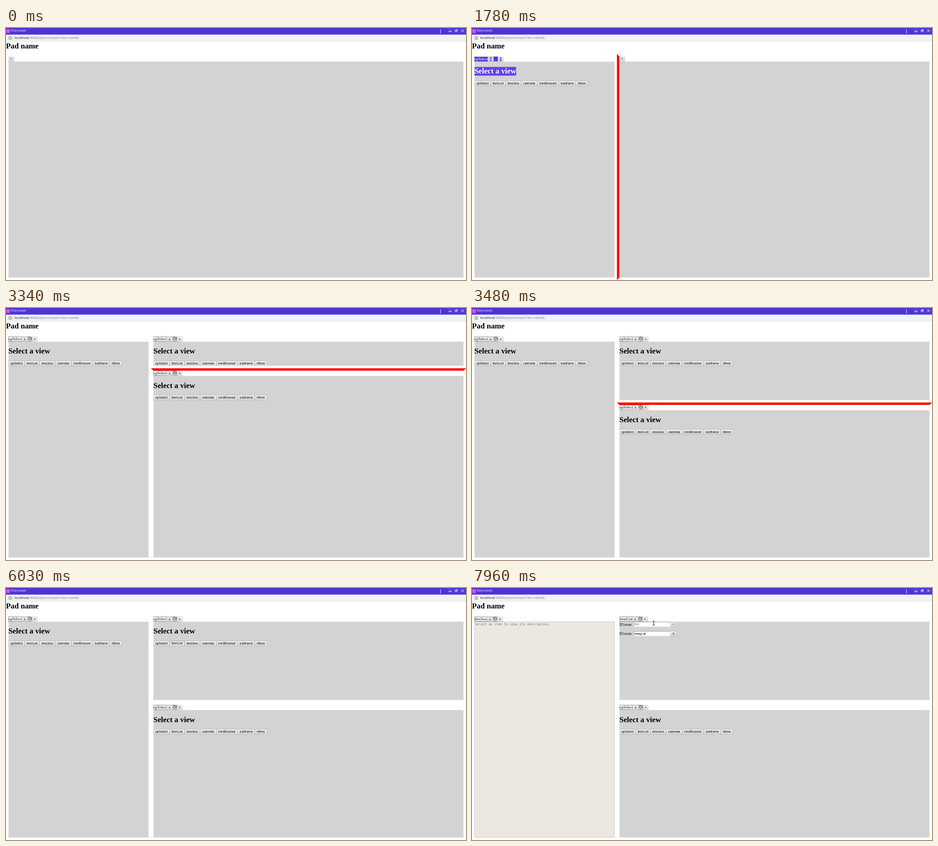
Animation of 1010x554 px, one loop 8 s. Source, as an HTML page:

```html
<!DOCTYPE html>
<html lang="en">
<head>
<meta charset="utf-8">
<title>Polymorph</title>
<style>
  html, body { margin: 0; width: 100%; height: 100%; overflow: hidden; background: #fff; }
  /* The desktop is laid out at 1920 px wide and shrunk to the 1010 px stage. */
  #desktop { position: absolute; width: 1920px; height: 1053px; overflow: hidden;
    transform: scale(.526042); transform-origin: 0 0; font: 16px "Liberation Serif", serif; color: #000; }
  #desktop * { box-sizing: border-box; }
  h1 { font-size: 32px; line-height: 37px; margin: 21.4px 0; position: relative; }

  #titlebar, #address { position: absolute; left: 0; width: 100%; height: 28px; white-space: nowrap; }
  #titlebar { top: 0; background: #4b35d5; color: #eeeaff; font: 12px/25px "DejaVu Sans", sans-serif; padding-left: 21px; }
  #address { top: 28px; background: #f1f3f4; color: #80868b; border-bottom: 1px solid #cfd1d3;
    font: 14px/27px "DejaVu Sans", sans-serif; padding-left: 34px; }
  #address b { font-weight: 400; color: #2c2e32; }
  #favicon { position: absolute; left: 1px; top: 5px; width: 16px; height: 16px; background: #ee45dc; }
  .icons { position: absolute; left: 0; top: 0; }
  #padname { position: absolute; left: 0; top: 56px; margin: 0; }

  .pane { position: absolute; border: 10px solid transparent; overflow: hidden; }
  .head { display: flex; align-items: center; height: 22px; width: max-content; }
  .tab { display: flex; align-items: center; height: 20px; border: 1px solid #000; line-height: 18px; }
  .gear { width: 17px; height: 19px; margin-top: -3px; }
  .pane[data-view=none] .head { height: 21px; }
  .pane[data-view=none] .tab { display: none; }
  .body { position: absolute; top: 22px; left: 0; right: 0; bottom: 0; background: lightgray; }
  .pane[data-view=none] .body { top: 21px; }
  .view { display: none; }
  .pane[data-view=opSelect] .opSelect, .pane[data-view=itemList] .itemList,
  .pane[data-view=descbox] .descbox { display: block; }

  button { font: 13.333px/15px "Liberation Sans", Arial, sans-serif; height: 21px; margin: 0; padding: 0 7px;
    border: 1px solid #a3a3a3; border-radius: 2px; background: linear-gradient(#f2f2f2, #d9d9d9);
    color: #000; vertical-align: top; flex: none; }
  button.hover { background: linear-gradient(#fff, #e8e8e8); }
  button.press { background: linear-gradient(#dfdfdf, #f0f0f0); border-color: #858585; }
  .close, .add { font-weight: 700; }
  .close { color: #e00012; }
  .add { color: #3a1fe0; }

  .mark { position: absolute; left: 0; top: 0; background: #6042ee; color: #fff; }
  .selected .tab > span, .selected .head button span { background: #5236e2; color: #fff; }
  .selected .gear { background: #5236e2; }
  .selected .gear * { opacity: 0; }

  .row { height: 39px; display: flex; line-height: 21px; white-space: nowrap; }
  .field { width: 154px; height: 21px; margin-left: 7px; padding: 0 1px; background: #fff; border: 2px solid;
    border-color: #9a9a9a #eee #eee #9a9a9a; font: 13.333px/17px "Liberation Sans", Arial, sans-serif; }
  .hint { color: #8a8a8a; }
  .descbox { position: absolute; inset: 0; background: #ece7e1; border: 1px solid #a9a9a9; padding: 2px;
    font: 13.333px/16px "DejaVu Sans Mono", monospace; color: #757575; white-space: nowrap; }
  #ibeam { position: absolute; left: 752px; top: 136px; }
</style>
</head>
<body>
<div id="desktop">
  <div id="titlebar">
    <i id="favicon"></i>Polymorph
    <svg class="icons" width="1920" height="28" fill="none" stroke="#fff" stroke-width="1.6">
      <path d="M1813.500 6v3m0 3.500v3m0 3.500v3" stroke-width="3.500"/>
      <path d="M1844 3h19v17h-19zM1870 3h19v17h-19zM1896 3h19v17h-19z" fill="#5c48da" stroke="none"/>
      <path d="M1848 14.500h11" stroke-width="2.500"/>
      <path d="M1875 10h6v5h-6zM1877.500 9.500V7h6.500v5.500h-2.500M1901.500 7.500l8 8m0-8l-8 8"/>
    </svg>
  </div>
  <div id="address">
    <svg class="icons" width="34" height="28" fill="none" stroke="#50545a" stroke-width="1.600">
      <circle cx="18" cy="14" r="6.500"/><path d="M18 9.800v1.800m0 1.400v5"/>
    </svg><b>localhost</b>:8080/polymorph/?doc=test&amp;
  </div>
  <h1 id="padname">Pad name</h1>
  <svg id="ibeam" width="13" height="22" fill="none">
    <path id="beam" d="M2 2q4 0 4.500 3q.5-3 4.500-3M6.500 5v12M2 20q4 0 4.500-3q.5 3 4.500 3" stroke="#fff" stroke-width="4"/>
    <use href="#beam"/>
    <path d="M2 2q4 0 4.500 3q.5-3 4.500-3M6.500 5v12M2 20q4 0 4.500-3q.5 3 4.500 3" stroke="#111" stroke-width="2"/>
  </svg>
</div>
<script>
const LOOP = 8000, WIDTH = 1920, TOP = 109, BOTTOM = 1053;
const VIEWS = ['opSelect', 'itemList', 'descbox', 'calendar', 'miniBrowser', 'subframe', 'httree'];
const desktop = document.getElementById('desktop');
const ibeam = document.getElementById('ibeam');

const GEAR = `<svg class="gear" viewBox="0 0 17 19" fill="none" stroke="#333">
  <circle cx="8.500" cy="9.500" r="7.200" stroke-width="2" stroke-dasharray="2.800 2.855"/>
  <circle cx="8.500" cy="9.500" r="5.800" stroke-width="1.400"/>
  <circle cx="8.500" cy="9.500" r="2.600" stroke-width="1.300"/></svg>`;

function makePane() {
  const el = document.createElement('div');
  el.className = 'pane';
  el.innerHTML = `
    <div class="head"><div class="tab"><span class="name"></span><button class="close"><span>x</span></button>${GEAR}</div>
      <button class="add"><span>+</span></button></div>
    <div class="body">
      <div class="view opSelect"><h1>Select a view<span class="mark">Select a view</span></h1>${
        VIEWS.map(name => `<button>${name}</button>`).join('<wbr>')}</div>
      <div class="view itemList">
        <div class="row">ID:none<div class="field hint">title</div><button>&gt;</button></div>
        <div class="row">ID:none<div class="field">meep af</div><button>X</button></div></div>
      <div class="view descbox">Select an item to view its description.</div>
    </div>`;
  desktop.insertBefore(el, ibeam);
  return {
    el,
    name: el.querySelector('.name'),
    mark: el.querySelector('.mark'),
    choices: [...el.querySelectorAll('.opSelect button')]
  };
}

const left = makePane(), upper = makePane(), lower = makePane();

// Each key is [time, value]; a value holds until the next key.
const splitX = [[0, 0], [1330, 22], [1410, 146], [1490, 433], [1570, 530], [1640, 580], [1710, 600], [1780, 605]];
const splitY = [[0, TOP], [3270, 170], [3340, 252], [3400, 325], [3470, 395], [3530, 440], [3600, 468], [3660, 478]];
const upperPointer = [[0, ''], [4670, '0 hover'], [5270, '0 press'], [5340, '0 hover'], [5490, ''],
  [5560, '1 hover'], [6030, '1 press'], [6100, '']];
const leftPointer = [[0, ''], [6530, '5 hover'], [6740, '4 hover'], [6800, '2 hover'], [7490, '2 press'], [7570, '']];

const keyIndex = (keys, t) => keys.findLastIndex(key => key[0] <= t);
const valueAt = (keys, t) => keys[keyIndex(keys, t)][1];
const within = (t, from, to) => t >= from && t < to;

function show(pane, x, y, right, bottom, view, redSide, pointer = '') {
  const { el } = pane, width = right - x, height = bottom - y;
  el.style.display = width > 0 && height > 0 ? '' : 'none';
  Object.assign(el.style, { left: x + 'px', top: y + 'px', width: width + 'px', height: height + 'px' });
  el.style.borderColor = ['top', 'right', 'bottom', 'left']
    .map(side => side === redSide ? 'red' : 'transparent').join(' ');
  el.dataset.view = view;
  pane.name.textContent = view;
  const [index, state] = pointer.split(' ');
  pane.choices.forEach((button, i) => button.className = index && i === +index ? state : '');
}

function select(pane, on, reach) {
  pane.el.classList.toggle('selected', on);
  pane.mark.style.display = on ? '' : 'none';
  pane.mark.style.clipPath = `inset(0 calc(100% - ${Math.max(0, reach)}px) 0 0)`;
}

function render(t) {
  const x = valueAt(splitX, t), y = valueAt(splitY, t);

  show(left, 0, TOP, x, BOTTOM, t < 7570 ? 'opSelect' : 'descbox', '', valueAt(leftPointer, t));
  show(upper, x, TOP, WIDTH, y, t < 6100 ? 'opSelect' : 'itemList',
    within(t, 3660, 3820) ? 'bottom' : within(t, 6450, 6530) ? 'left' : '', valueAt(upperPointer, t));
  show(lower, x, y, WIDTH, BOTTOM, t < 3270 ? 'none' : 'opSelect',
    within(t, 700, 2130) ? 'left' : within(t, 2690, 3660) ? 'top' : '');

  // The text selection trails the dragged divider by one step.
  const previous = splitX[Math.max(0, keyIndex(splitX, t) - 1)][1];
  select(left, within(t, 1330, 2030), previous - 10);
  select(upper, false, 0);
  select(lower, false, 0);

  ibeam.style.display = t >= 7960 ? '' : 'none';
}

const start = performance.now();
function tick() {
  render((performance.now() - start) % LOOP);
  requestAnimationFrame(tick);
}
tick();
</script>
</body>
</html>
```
